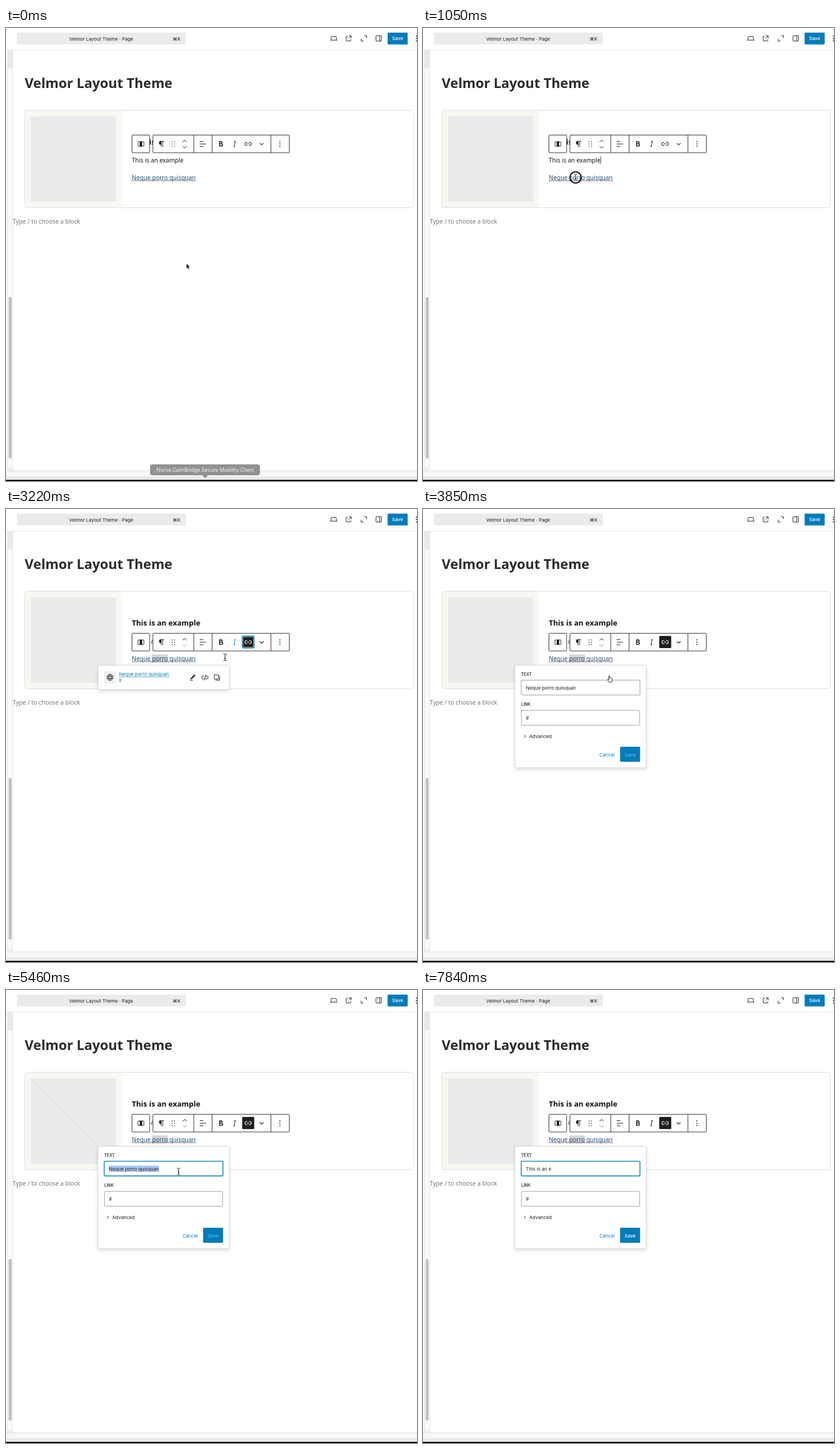
These frames come from a looping animation (713 by 785 pixels, 8 s). An HTML page:

```html
<!DOCTYPE html>
<html lang="en">
<head>
<meta charset="utf-8">
<title>Block editor link form</title>
<style>
  html, body { margin: 0; width: 100%; height: 100%; overflow: hidden; background: #fff; }
  svg { display: block; width: 713px; height: 785px; }
  .ui { font: 8.2px Inter, 'DejaVu Sans', sans-serif; fill: #1e1e1e; }
  .page { font: 10.4px 'Noto Sans', sans-serif; fill: #111; }
  .bold { font-weight: 700; }
  .mid { font-weight: 500; }
  .label { font-size: 7.15px; font-weight: 500; }
  .white { fill: #fff; }
  .blue { fill: #007cba; }
  .icon { fill: #1e1e1e; }
  .line { fill: none; stroke: #1e1e1e; stroke-width: 1.5; }
  .dots { stroke: #d0604f; stroke-width: .8; stroke-dasharray: 1 .8; }
  .box { fill: #fff; stroke: #1e1e1e; stroke-width: .9; }
  #popup > rect:first-child, #form > rect:first-child { filter: drop-shadow(0 3px 3px rgba(0, 0, 0, .13)); }
</style>
</head>
<body>
<script>
const BLUE = '#007cba', INK = '#1e1e1e';

// Icons sit on a 24-unit grid, centred on the given point.
const icon = (x, y, body) => `<g transform="translate(${x - 7.8} ${y - 7.8}) scale(.65)">${body}</g>`;
const solid = (x, y, d) => icon(x, y, `<path class="icon" fill-rule="evenodd" d="${d}"/>`);
const line = (x, y, d) => icon(x, y, `<path class="line" d="${d}"/>`);
const rect = (x, y, w, h, rest) => `<rect x="${x}" y="${y}" width="${w}" height="${h}" ${rest}/>`;
const text = (x, y, str, cls = 'ui', rest = '') => `<text x="${x}" y="${y}" class="${cls}" ${rest}>${str}</text>`;
const dots = (x, ys, r = 1) => ys.map(y => `<circle cx="${x}" cy="${y}" r="${r}" class="icon"/>`).join('');

const frame = `
  ${rect(19, 8, 293, 20.5, 'rx="2" fill="#ebebeb"')}
  ${text(165, 21.5, 'Velmor Layout Theme · Page', 'ui', 'text-anchor="middle"')}
  ${text(289, 21.5, '⌘K')}
  ${line(568.5, 18, 'M5 16V8.2Q5 6.8 6.4 6.8H17.6Q19 6.8 19 8.2V16M2.2 16.7H21.8')}
  ${line(594.5, 18, 'M12.5 5.25h6.25V11.5M18.5 5.5L11.5 12.5M9.5 6.25H6.5Q5.25 6.25 5.25 7.5V17.5Q5.25 18.75 6.5 18.75H16.5Q17.75 18.75 17.75 17.5V14.5')}
  ${line(620.8, 18, 'M13 4.75h6.25V11M11 19.25H4.75V13')}
  ${line(646.6, 18, 'M6 4.75H18Q19.25 4.75 19.25 6V18Q19.25 19.25 18 19.25H6Q4.75 19.25 4.75 18V6Q4.75 4.75 6 4.75ZM14.75 5V19')}
  ${rect(662, 8, 34.8, 20.5, `rx="1.3" fill="${BLUE}"`)}
  ${text(679.4, 21.4, 'Save', 'ui mid white', 'text-anchor="middle"')}
  ${dots(712, [14.2, 18.3, 22.4])}
  ${rect(0, 37.8, 713, .8, 'fill="#ddd"')}
  ${rect(2, 38.5, 9.5, 31.5, 'fill="#e9e9e9"')}
  ${rect(2, 70, 9.5, 698, 'fill="#fafafa"')}
  ${rect(2, 70, .8, 698, 'fill="#ddd"')}
  ${rect(11.3, 38.5, .8, 729, 'fill="#ddd"')}
  ${rect(3, 762, 8.3, 5.5, 'fill="#f0f0f0"')}
  ${rect(4.6, 466, 5.2, 280, 'rx="2.6" fill="#c1c1c1"')}
  ${rect(0, 767.3, 713, .9, 'fill="#d8d8d8"')}
  ${rect(0, 768.2, 713, 8.8, 'fill="#f7f7f7"')}
  ${rect(0, 777, 713, 6, 'fill="#e8e8e8"')}
  ${rect(0, 783, 713, 2, 'fill="#000"')}`;

const content = `
  ${text(32.6, 104, 'Velmor Layout Theme', 'page bold', 'style="font-size:23.4px;fill:#2b2b2b"')}
  <path d="M201 143H37Q33 143 33 147V307Q33 311 37 311H201Z" fill="#f8f8f3"/>
  ${rect(43, 153, 148, 148, 'fill="#ebebeb"')}
  <path d="M43 153L191 301" stroke="#d4d4d4" stroke-width=".8"/>
  ${rect(32.7, 142.6, 674.2, 168.8, 'rx="4" fill="none" stroke="#d9d9d9" stroke-width=".9"')}
  ${text(218.3, 202, 'This is an example', 'page bold', 'style="font-size:13px"')}
  ${text(218.3, 233, 'This is an example', 'page')}
  ${rect(307.8, 222.5, .8, 13, 'id="bodyCaret" fill="#111"')}
  ${rect(218.3, 252, 110.7, 13.5, 'id="linkBg" fill="#dbe6ee"')}
  ${rect(253.3, 252, 27.5, 13.5, 'id="word"')}
  ${text(218.3, 262.6, 'Neque porro quisquan', 'page', 'style="fill:#1c4f78"')}
  <path d="M218.3 264.1H329" stroke="#1c4f78" stroke-width=".7"/>
  <path d="M218.3 265.1H329" class="dots"/>
  ${text(11.6, 338.6, 'Type / to choose a block', 'page', 'style="fill:#757575"')}`;

const toolbar = `<g id="toolbar">
  ${rect(218.5, .5, 30.6, 30.6, 'rx="1" class="box"')}
  ${rect(254.9, .5, 236.5, 30.6, 'rx="1" class="box"')}
  <path d="M325.8 .5V31M357.5 .5V31M459.6 .5V31" stroke="${INK}" stroke-width=".9"/>
  ${rect(229, 12, 10.2, 8, 'rx="1" fill="none" stroke="#1e1e1e"')}
  ${rect(232, 12, 4.2, 8, 'class="icon"')}
  ${solid(270, 16, 'M10 14V20H11.5V5.5H14V20H15.5V5.5H18.5V4H10A5 5 0 0 0 10 14Z')}
  ${dots(288.2, [12, 16, 20], .8)}${dots(292.4, [12, 16, 20], .8)}
  <path d="M306.3 12.6L309.8 9.4L313.3 12.6" class="line" style="stroke-width:1"/>
  <path id="down" d="M306.3 19.8L309.8 23L313.3 19.8" class="line" style="stroke-width:1"/>
  <path d="M336 11.6H342.3M336 16H347M336 20.4H342.3" class="line" style="stroke-width:1"/>
  ${solid(373, 15.8, 'M14.7 11.3c1-.6 1.5-1.6 1.5-3 0-2.3-1.3-3.4-4-3.4H7v14h5.8c1.4 0 2.5-.3 3.3-1 .8-.7 1.2-1.7 1.2-2.9.1-1.9-.8-3.1-2.6-3.7zM9.6 7.3h2.3q1.9 0 1.9 1.6t-1.9 1.6H9.6zM12.5 16.7H9.6v-3.9h2.9q2.3 0 2.3 2t-2.3 1.9z')}
  <g id="italic" stroke="${INK}">${icon(396.6, 15.8, '<path d="M11 5.2H15.4M8.8 18.8H13M13.4 5L10.8 19" fill="none" stroke-width="1.6"/>')}</g>
  ${rect(409.8, 5.2, 20.8, 20.8, 'id="active" rx="1.3" fill="#1e1e1e"')}
  <g id="ring">
    ${rect(409.9, 5.3, 20.6, 20.6, `rx="1.3" fill="none" stroke="${BLUE}" stroke-width="1.3"`)}
    ${rect(411, 6.4, 18.4, 18.4, 'fill="none" stroke="#fff" stroke-width=".7"')}
  </g>
  <g id="chain" stroke="${INK}">${icon(420, 15.8, '<path d="M10 8H7.5a4 4 0 0 0 0 8H10M14 8h2.5a4 4 0 0 1 0 8H14M9 12h6" fill="none" stroke-width="1.6"/>')}</g>
  <path d="M440.2 14.6L443.5 17.6L446.8 14.6" class="line" style="stroke-width:1.1"/>
  ${dots(475.2, [11.8, 15.8, 19.8], .95)}
</g>`;

const panel = h => rect(159.4, 270.8, 228, h, 'rx="2" fill="#fff" stroke="#ccc" stroke-width=".8"');

const popup = `<g id="popup">
  ${panel(42)}
  ${rect(170, 281.2, 20.8, 20.8, 'rx="1.3" fill="#f0f0f0"')}
  ${line(180.4, 291.7, 'M12 4A8 8 0 1 0 12 20A8 8 0 1 0 12 4ZM12 4Q5 12 12 20Q19 12 12 4M4.5 9.3H19.5M4.5 14.7H19.5')}
  ${text(196, 289.4, 'Neque porro quisquan', 'ui blue')}
  <path d="M196 290.9H283.5" stroke="${BLUE}" stroke-width=".7"/>
  ${text(196, 300.4, '#', 'ui', 'style="font-size:7.2px;fill:#555"')}
  ${solid(324, 292, 'M19 6.6L16.2 4L7 13.4L5.8 17.2L9.8 16ZM4.5 18.6H12V20H4.5Z')}
  ${line(345.3, 292, 'M10 8H7.5a4 4 0 0 0 0 8H9M14 8h2.5a4 4 0 0 1 0 8H13M14.5 4L9.5 20')}
  ${line(366, 292, 'M5 4.75H15Q16.25 4.75 16.25 6V15Q16.25 16.25 15 16.25H5.5Q4.75 16.25 4.75 15V6Q4.75 4.75 6 4.75ZM8 19.25H19.25V8')}
</g>`;

const form = `<g id="form">
  ${panel(177.6)}
  ${text(170.2, 289.3, 'TEXT', 'ui label')}
  ${rect(170.4, 296.6, 206, 25.7, 'id="field" rx="1.3" fill="#fff"')}
  ${rect(178.6, 304, 0, 11, 'id="fieldSel" fill="#accef7"')}
  ${text(178.6, 312.6, '', 'ui', 'id="typed" xml:space="preserve"')}
  <path id="fieldDots" d="M178.6 314.3H266" class="dots"/>
  ${rect(0, 304.2, .8, 10.6, 'id="caret" fill="#111"')}
  ${text(170.4, 341.2, 'LINK', 'ui label')}
  ${rect(170.8, 349, 205, 25.8, 'rx="1.3" fill="#fff" stroke="#949494" stroke-width=".9"')}
  ${text(178.6, 365.2, '#')}
  <path d="M175.4 391.6L177.8 394L175.4 396.4" class="line" style="stroke-width:1"/>
  ${text(184.2, 397, 'Advanced')}
  ${text(306, 428.5, 'Cancel', 'ui blue')}
  ${rect(342, 412, 34.6, 26, `rx="1.3" fill="${BLUE}"`)}
  ${text(359.3, 428.5, 'Save', 'ui mid white', 'id="save" text-anchor="middle"')}
</g>`;

const tooltip = `<g id="tooltip">
  <path d="M253.5 756.8H437Q440 756.8 440 759.8V771.5Q440 774.5 437 774.5H350.5L345.5 779.5L340.5 774.5H253.5Q250.5 774.5 250.5 771.5V759.8Q250.5 756.8 253.5 756.8Z" fill="#929292" stroke="#7c7c7c" stroke-width=".8"/>
  ${text(345.5, 769, 'Norva CalmBridge Secure Mobility Client', 'ui', 'text-anchor="middle" style="font-size:8.75px;fill:#f4f4f4"')}
</g>`;

const beam = 'M-2.8 -5.7Q-.3 -5.7 0 -4.6Q.3 -5.7 2.8 -5.7M0 -4.6V4.8M-2.8 5.9Q-.3 5.9 0 4.8Q.3 5.9 2.8 5.9M-1.3 1.6H1.3';
const pointer = `<g id="pointer">
  <circle id="click" fill="none" stroke="#111" stroke-width="2.1"/>
  <path id="arrow" d="M0 0V9.2L2.1 7.3L3.6 10.7L5.2 10L3.7 6.7H6.5Z" fill="#000" stroke="#fff" stroke-width=".7"/>
  <g id="beam" fill="none"><path d="${beam}" stroke="#fff" stroke-width="2"/><path d="${beam}" stroke="#111" stroke-width="1"/></g>
  <path id="hand" d="M-1.6 -4.4Q-.8 -5.3 0 -4.4V-1.2Q1 -1.7 1.7 -.9Q2.6 -1.2 3 -.4Q4.2 -.5 4.2 .7V3.2L3.2 6H-1.3L-3.6 2.4Q-4.2 1 -3 .9L-1.6 2Z" fill="#fff" stroke="#111" stroke-width=".9" stroke-linejoin="round"/>
</g>`;

document.body.innerHTML =
  `<svg viewBox="0 0 713 785">${frame}${content}${toolbar}${popup}${form}${tooltip}${pointer}</svg>`;

const el = {};
document.querySelectorAll('[id]').forEach(n => el[n.id] = n);
const set = (id, attrs) => { for (const k in attrs) el[id].setAttribute(k, attrs[k]); };
const show = (id, on) => set(id, { visibility: on ? 'inherit' : 'hidden' });
const clamp = v => Math.min(1, Math.max(0, v));

const LOOP = 8000, STEP = 70;
const SELECT = 1190, POPUP = 1260, PRESS = 2310, FORM = 3780, FOCUS = 3990, MARK = 5320, TYPE = 5950;
const route = [
  [0, 313, 408], [770, 264.7, 259], [1330, 264.7, 259], [2170, 411.5, 239.5], [2450, 411.5, 239.5],
  [2800, 413.5, 240.5], [2870, 413.5, 240.5], [3010, 416, 241.5], [3080, 416, 241.5], [3220, 380, 257],
  [3570, 324, 292], [3850, 324, 294], [4340, 299.5, 320], [4690, 299.5, 319], [5250, 299.5, 314.5]
];
const shapes = [[0, 'arrow'], [560, 'beam'], [1960, 'hand'], [3150, 'beam'], [3360, 'hand'], [FOCUS, 'beam'], [TYPE, '']];
const typing = [
  [0, 'Neque porro quisquan'], [TYPE, 'T'], [6160, 'Th'], [6300, 'Thi'], [6440, 'This'], [6580, 'This '],
  [6720, 'This is'], [6930, 'This is '], [7000, 'This is a'], [7140, 'This is an'], [7280, 'This is an '], [7350, 'This is an e']
];

const at = (table, t) => table.findLast(row => row[0] <= t);

function position(t) {
  const a = at(route, t), b = route[route.indexOf(a) + 1];
  if (!b) return a.slice(1);
  const k = (t - a[0]) / (b[0] - a[0]), e = k * k * (3 - 2 * k);
  return [a[1] + (b[1] - a[1]) * e, a[2] + (b[2] - a[2]) * e];
}

function draw(t) {
  const selected = t >= SELECT, pressed = t >= PRESS, open = t >= FORM;

  set('tooltip', { opacity: 1 - clamp(t / 280) });
  show('bodyCaret', t >= 280 && !selected);
  show('linkBg', selected && !pressed);
  show('word', selected);
  set('word', { fill: pressed ? '#d3d5d6' : '#9fcaf8' });

  set('toolbar', { transform: `translate(0 ${selected ? 214.9 : 185})` });
  set('down', { style: `stroke-width:1;stroke:${selected ? '#999' : INK}` });
  show('active', selected);
  set('chain', { stroke: selected ? '#fff' : INK });
  show('ring', pressed && !open);
  set('italic', { stroke: t >= 3150 && t < 3360 ? BLUE : INK });

  show('popup', t >= POPUP && !open);
  show('form', open);
  if (open) {
    const focus = t >= FOCUS, marked = t >= MARK && t < TYPE;
    set('field', { stroke: focus ? BLUE : '#949494', 'stroke-width': focus ? 1.4 : .9 });
    el.typed.textContent = at(typing, t)[1];
    const width = el.typed.getComputedTextLength();
    set('fieldSel', { width: marked ? width : 0 });
    set('caret', { x: 178.6 + width });
    show('caret', focus && !marked && t < 7840);
    show('fieldDots', focus && t < TYPE);
    set('save', { opacity: .4 + .6 * clamp((t - TYPE + STEP) / 350) });
  } else {
    ['fieldDots', 'caret'].forEach(id => show(id, false));
  }

  const shape = at(shapes, t)[1];
  ['arrow', 'beam', 'hand'].forEach(id => show(id, id === shape));
  set('pointer', { transform: `translate(${position(t)})` });
  show('click', t >= 980 && t < SELECT);
  set('click', { r: t < 1050 ? 8 : 9.7 });
}

const start = performance.now();
function tick() {
  const t = (performance.now() - start) % LOOP;
  draw(Math.floor(t / STEP) * STEP);
  requestAnimationFrame(tick);
}
tick();
</script>
</body>
</html>
```
